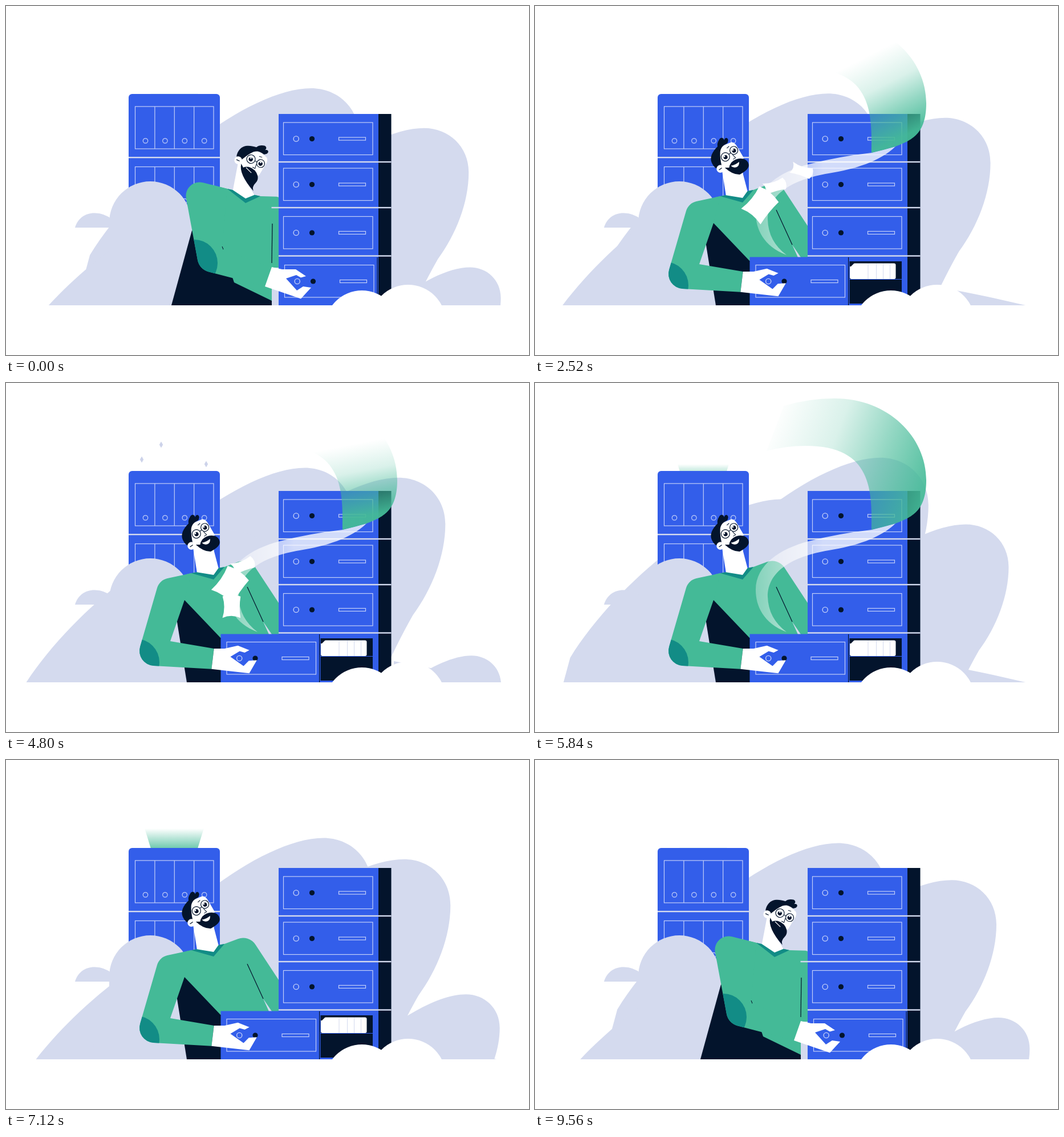
Animation, 917 px wide and 611 px high, one loop 9.6 s. Source, as an HTML page with a canvas:

```html
<!DOCTYPE html>
<html lang="en">
<head>
<meta charset="utf-8">
<title>Cloud archive</title>
<style>
html, body { margin: 0; width: 100%; height: 100%; overflow: hidden; background: #fff; }
canvas { display: block; }
</style>
</head>
<body>
<canvas id="stage" width="917" height="611"></canvas>
<script>
const ctx = document.getElementById('stage').getContext('2d');
const LOOP = 9600, GROUND = 524, DEG = Math.PI / 180;
const BLUE = '#335eea', DARK = '#03142c', GREEN = '#44ba97', TEAL = '#128c86';
const CLOUD = '#d4daee', LINE = '#c3cff8', WHITE = '#fff';

// ---------- helpers ----------
const clamp = u => Math.min(1, Math.max(0, u));
const ramp = (t, a, b) => {
  const u = clamp((t - a) / (b - a));
  return u * u * (3 - 2 * u);
};
const bump = (t, center, width) => Math.exp(-(((t - center) / width) ** 2));
const lerp = (a, b, u) => a + (b - a) * u;
const between = (p, q, u) => p.map((v, i) => lerp(v, q[i], u));
const shift = ([x, y], dx, dy) => [x + dx, y + dy];
const spin = ([x, y], angle) => [
  x * Math.cos(angle) - y * Math.sin(angle),
  x * Math.sin(angle) + y * Math.cos(angle)
];
const green = a => `rgba(68,186,151,${a})`;
const white = a => `rgba(255,255,255,${a})`;

function fill(path, color) { ctx.fillStyle = color; ctx.fill(path); }
function stroke(path, color, width = 1.2) {
  ctx.strokeStyle = color; ctx.lineWidth = width; ctx.stroke(path);
}
function box(x, y, w, h, color) { ctx.fillStyle = color; ctx.fillRect(x, y, w, h); }
function frame(x, y, w, h) {
  ctx.strokeStyle = LINE; ctx.lineWidth = 1.2; ctx.strokeRect(x, y, w, h);
}
function disc(x, y, r) {
  const path = new Path2D();
  path.arc(x, y, r, 0, 7);
  return path;
}
// corners are [x, y] or [x, y, radius]
function shape(...corners) {
  const path = new Path2D(), n = corners.length;
  path.moveTo(...between(corners[n - 1], corners[0], .5).slice(0, 2));
  corners.forEach(([x, y, r = 0], i) => {
    const [nx, ny] = corners[(i + 1) % n];
    path.arcTo(x, y, nx, ny, r);
  });
  path.closePath();
  return path;
}
function gradient(x0, y0, x1, y1, stops) {
  const g = ctx.createLinearGradient(x0, y0, x1, y1);
  for (const [at, color] of stops) g.addColorStop(at, color);
  return g;
}
// moves the origin to x, y for the time of one drawing
function at(x, y, angle, scale, paint) {
  ctx.save();
  ctx.translate(x, y);
  ctx.rotate(angle);
  ctx.scale(scale, scale);
  paint();
  ctx.restore();
}

// ---------- drifting clouds ----------
const leaf = new Path2D('M-425,600 L-401,340 L-388,292 C-300,150 -110,0 0,0 C46,0 84,34 84,83 ' +
  'C84,140 60,200 26,246 Q-5,300 -40,380 V600 Z');
// one stop every STEP ms, the spline between them gives the drift
const STEP = 1200, FIRST = -3600;
const stops = [[310, 500], [387, 290], [417, 215], [535, 144], [626, 134], [711, 187],
  [781, 303], [816, 477], [835, 700]];
function drift(age) {
  const pos = (age - FIRST) / STEP, i = Math.floor(pos), u = pos - i;
  const p = k => stops[Math.min(stops.length - 1, Math.max(0, i + k))];
  return [0, 1].map(k => {
    const a = p(-1)[k], b = p(0)[k], c = p(1)[k], d = p(2)[k];
    return b + u / 2 * (c - a + u * (2 * a - 5 * b + 4 * c - d + u * (3 * (b - c) + d - a)));
  });
}
function clouds(t) {
  fill(new Path2D('M680,487 Q752,500 803,511 L860,524 H680 Z'), CLOUD);
  for (const birth of [0, 2740, 4920, 6860]) {
    const age = (t - birth - FIRST + LOOP) % LOOP + FIRST;
    if (age > 5200) continue;
    const shrink = .05 * clamp(-age / 1000) + .38 * Math.max(0, (age - 1000) / 3800) ** 2.2;
    at(...drift(age), 0, 1 - shrink, () => fill(leaf, CLOUD));
  }
}

// ---------- back cabinet, its beam and sparks ----------
function beam(t) {
  const h = 3 + 71 * (ramp(t, 2950, 3500) - ramp(t, 4000, 4550) + ramp(t, 5700, 6300) - ramp(t, 6860, 7350));
  const a = .08 + .72 * Math.min(1, h / 36), spread = 41 + h * .31;
  fill(shape([254, 155], [295 - spread, 155 - h], [295 + spread, 155 - h], [336, 155]),
    gradient(0, 155, 0, 155 - h, [[0, green(a)], [1, green(0)]]));
}
function sparks(t) {
  for (const [start, life] of [[3300, 1750], [6200, 850]]) {
    const u = (t - start) / life, far = (u - .15) / .71;
    if (u < 0 || u > 1) continue;
    ctx.globalAlpha = Math.min(1, u * 9) * (1 - ramp(u, .86, 1));
    const [r, g, b] = between([110, 125, 184], [205, 211, 234], clamp(far));
    for (const [x, y, dx, dy] of [[277, 124, -5, -16], [251, 145, -13, -11], [338, 151, 13, -9]]) {
      const p = [x + dx * far, y + dy * far];
      fill(shape(shift(p, 0, -5.5), shift(p, 3.2, 0), shift(p, 0, 5.5), shift(p, -3.2, 0)), `rgb(${r},${g},${b})`);
    }
    ctx.globalAlpha = 1;
  }
}
function cabinet() {
  const body = new Path2D();
  body.roundRect(215, 154, 160, 210, 6);
  fill(body, BLUE);
  box(215, 264, 160, 2.4, CLOUD);
  for (const y of [176, 281.5]) {
    frame(226.5, y, 137.5, 74);
    for (let i = 0; i < 4; i++) {
      const x = 226.5 + i * 34.4;
      if (i) stroke(new Path2D(`M${x},${y} v74`), LINE);
      stroke(disc(x + 18, y + 60, 4.2), LINE);
    }
  }
}
function hill() {
  const mound = disc(253, 379, 72);
  mound.rect(181, 379, 144, 146);
  fill(mound, CLOUD);
  fill(new Path2D('M121,388 C126,371 140,362 156,362.500 Q173,363 185,373 V388 Z'), CLOUD);
}
function archive(t) {
  const squash = .012 * (bump(t, 3560, 180) + bump(t, 6300, 180));
  const squeezed = (amount, paint) => at(295, GROUND, 0, 1 - amount, () => {
    ctx.translate(-295, -GROUND);
    paint(t);
  });
  squeezed(squash, beam);
  squeezed(squash, cabinet);
  squeezed(squash / 2, hill);
}

// ---------- man ----------
// key points at the closed drawer, with the drawer pulled, and leaning back
const rig = {
  shoulder: [[309, 300], [299, 322], [269, 345]],
  elbow: [[339, 461], [224, 456], [226, 493]],
  innerElbow: [[381, 427], [295, 430], [288, 452]],
  armpit: [[379, 421], [335, 365], [313, 380]],
  patch: [[330, 450], [228, 455], [228, 489]],
  neckLeft: [[388, 320], [357, 323], [325, 333]],
  neckRight: [[446, 333], [416, 325], [383, 322]],
  collar: [[420, 345], [391, 341], [364, 344]],
  farShoulder: [[482, 334], [460, 316], [426, 306]],
  side: [[482, 350], [482, 371], [482, 391]],
  hip: [[466, 516], [466, 446], [466, 446]],
  waist: [[400, 484], [383, 446], [376, 446]],
  seat: [[326, 393], [317, 355], [293, 375]],
  knee: [[290, 524], [305, 524], [317, 524]],
  seamTop: [[467, 381], [447, 367], [423, 357]],
  seamEnd: [[466, 450], [461, 433], [451, 418]],
  ear: [[407, 270], [368, 273], [325, 285]],
  turn: [[40], [0], [-22]],
  chin: [[55, 24], [33, 25], [28, 22]]
};
const poseAt = t =>
  ramp(t, 400, 1300) + ramp(t, 1500, 2100) - ramp(t, 7700, 8300) - ramp(t, 8300, 9200);
function posed(pose) {
  const i = pose < 1 ? 0 : 1, joints = {};
  for (const name in rig) joints[name] = between(rig[name][i], rig[name][i + 1], pose - i);
  return joints;
}

function head(t, pose, [chinX, chinY]) {
  fill(new Path2D('M2,-2 L8,-24 L15,-36 L35,-36 Q41,-34 42,-24 L45,-4 L40,15 L8,12 Z'), WHITE);
  fill(new Path2D(`M8,1 Q16,18 ${chinX},${chinY} Q48,20 49,11 Q50,4 44,-1 Q34,-8 22,-3 Q17,0 15,4 Z`), DARK);
  fill(new Path2D('M4,-4 C6,-14 8,-22 11,-28 C16,-36 22,-36 28,-37 C34,-41 32,-48 27,-46 Q24,-44 24,-42 ' +
    'C27,-48 22,-52 17,-48 Q11,-44 10,-38 C-2,-33 -10,-26 -10,-16 Q-10,-8 -6,-3 Z'), DARK);
  fill(disc(0, 0, 6.7), WHITE);
  stroke(new Path2D('M-3,1 L3,-.5'), DARK);
  for (const [x, y, r] of [[16, -16, 7.5], [34, -21, 7]]) {
    stroke(disc(x, y, r), DARK);
    fill(disc(x, y + .5, 3.6), DARK);
    fill(disc(x - 1.4, y - 1.4, 1.4), WHITE);
  }
  stroke(new Path2D('M23.500,-18 L27,-19 M24,-29 L29,-31 M29,-15 L32,-8 L27,-7'), DARK, 1);
  if (bump(t, 3560, 220) > .37) fill(disc(27.5, 2, 3.8), WHITE);
  else if (pose < .5) stroke(new Path2D('M19,1 L32,2'), WHITE);
  else fill(new Path2D('M19,2 Q27,4 35,1 Q33,8 27,8 Q21,7 19,2'), WHITE);
}

// the hand slides with the drawer, then tilts as the man leans back
const palm = [[366, 457], [384, 461], [408, 461], [426, 473], [417, 475.5], [409, 471], [391, 477],
  [410, 498], [421, 491], [435, 493], [417, 512.5], [354, 491]];
function handAt(pose) {
  const tilt = -12.5 * DEG * Math.max(0, pose - 1), slide = 100 * (1 - Math.min(1, pose));
  return palm.map(p => shift(spin(shift(p, -402, -467), tilt), 402 + slide, 467));
}

function man(t, pose) {
  const j = posed(pose), hand = handAt(pose);
  const wristTop = hand[0], wristLow = hand[hand.length - 1];
  const turn = j.turn[0] * DEG, onHead = (x, y) => shift(spin([x, y], turn), ...j.ear);

  fill(shape(j.seat, j.knee, [466, GROUND], j.hip, shift(j.armpit, 0, -10)), DARK);
  fill(shape([...j.shoulder, 24], j.neckLeft, j.neckRight, [...j.farShoulder, pose < .5 ? 8 : 26],
    j.side, [482, 458], [466, 458], j.hip, j.waist, j.armpit), GREEN);

  const arm = shape([...j.shoulder, 24], [...j.elbow, 26], wristLow, wristTop, j.innerElbow, j.armpit, j.neckLeft);
  fill(arm, GREEN);
  ctx.save();
  ctx.clip(arm);
  fill(disc(...j.patch, 41), TEAL);
  ctx.restore();

  if (pose < .3) stroke(new Path2D('M379,421 L381,426'), DARK, 1);
  stroke(new Path2D(`M${j.seamTop} L${j.seamEnd}`), DARK);
  if (pose > 1) fill(shape(j.seamEnd, [466, 440], [461, 440]), CLOUD);

  const left = between(j.neckLeft, j.neckRight, .17), right = between(j.neckLeft, j.neckRight, .82);
  fill(shape(j.neckLeft, j.collar, j.neckRight), TEAL);
  fill(shape(onHead(2, 2), left, shift(j.collar, 0, -8), right, onHead(34, 19)), WHITE);
  at(...j.ear, turn, 1, () => head(t, pose, j.chin));
}

// ---------- server ----------
function panel(x, y) {
  frame(x, y, 156.5, 56.5);
  stroke(disc(x + 22.2, y + 28.5, 4.6), LINE, 1.4);
  fill(disc(x + 50, y + 28.5, 4.6), DARK);
  frame(x + 97, y + 26, 47, 5);
}
function server(pose) {
  box(478, 189, 175, 335, BLUE);
  box(653, 189, 22.5, 335, DARK);
  for (const y of [204, 284, 368.5]) panel(486.5, y);

  box(480, 447, 163, 74, DARK);
  const files = new Path2D();
  files.roundRect(552, 450.5, 80.5, 27.5, 3);
  fill(files, WHITE);
  fill(shape([551, 450], [560, 450], [554, 456], [551, 456]), DARK);
  for (const x of [583.5, 598, 610, 622]) box(x, 451, 1, 27, CLOUD);
  box(480, 478, 163, 1, BLUE);

  const x = 478 - 101.5 * Math.min(1, pose);
  box(x, 439.5, 175, 84.5, BLUE);
  box(x + 172.5, 440, 1.2, 84, DARK);
  panel(x + 10.5, 453.5);
  for (const [y, left] of [[273, 478], [353, 465.5], [437.5, 478]]) box(left, y - 1.2, 675.5 - left, 2.4, CLOUD);
}

// ---------- ribbon and papers ----------
const strand = new Path2D('M441,436 C400,420 387,390 387,362 C387,318 430,290 480,277 ' +
  'Q535,263 590,257 L632,246 C605,272 560,286 515,293 C450,304 408,330 408,374 Q409,412 441,436 Z');
const band = new Path2D('M590,257 C591,190 592,110 475,110 Q440,110 406,119 L436,40 Q480,27 525,27 ' +
  'C620,27 686,95 686,170 C686,225 660,235 632,246 Q612,252 590,257 Z');

const curve = (a, b, c, u) => lerp(lerp(a, b, u), lerp(b, c, u), u);
function paper(u) {
  const x = lerp(curve(440, 325, 420, u), curve(325, 420, 640, u), u);
  const y = lerp(curve(450, 350, 270, u), curve(350, 270, 250, u), u);
  const size = 30 + 15 * bump(u, .35, .1), w = size - 10 * ramp(u, .35, .5), h = size + 6;
  ctx.globalAlpha = 1 - ramp(u, .7, 1);
  at(x, y, (u - .2) * 4, 1, () =>
    fill(new Path2D(`M${-w / 2},${-h / 2} q${w / 2},-7 ${w},0 q-3,${h / 2} 0,${h} q${-w / 2},-7 ${-w},0 q6,${-h / 2} 0,${-h}`), WHITE));
}
function flight(t, start, full, fade, end) {
  if (t < start || t > end) return;
  const rise = ramp(t, start, start + 260);
  const grow = clamp((t - start) / (full - start)), leave = clamp((t - fade) / (end - fade));
  const tail = 375 + 200 * leave, faint = 1 - ramp(leave, 0, .2);
  ctx.globalAlpha = rise * (1 - ramp(leave, .45, .9));
  fill(strand, gradient(tail, 0, tail + 130, 0,
    [[0, white(.3 * faint)], [.5, white(.3 + .25 * faint)], [1, white(.65 + .13 * faint)]]));

  const lean = 50 * grow ** 2;
  ctx.globalAlpha = rise * (1 - ramp(leave, .35, 1));
  fill(band, gradient(640 + lean, 240 - lean, curve(640, 715, 410, grow), curve(236, 38, 82, grow),
    [[0, green(.95)], [.32, green(.58)], [.62, green(.2)], [1, green(0)]]));

  ctx.save();
  ctx.beginPath();
  ctx.rect(0, 0, 917, 440);
  ctx.clip();
  for (const lead of [-.15, 0, .15]) {
    const u = (t - start) / 1000 + lead;
    if (u > 0 && u < 1) paper(u);
  }
  ctx.restore();
  ctx.globalAlpha = 1;
}

// ---------- scene ----------
function draw(t) {
  const pose = poseAt(t);
  box(0, 0, 917, 611, WHITE);
  ctx.save();
  ctx.beginPath();
  ctx.rect(0, 0, 917, GROUND);
  ctx.clip();
  clouds(t);
  archive(t);
  sparks(t);
  man(t, pose);
  server(pose);
  fill(shape(...handAt(pose)), WHITE);
  flight(t, 2000, 2850, 3350, 4200);
  flight(t, 4450, 5200, 6000, 6850);
  fill(disc(624, 563, 65), WHITE);
  fill(disc(705, 554, 66), WHITE);
  ctx.restore();
}
function tick() {
  draw(performance.now() % LOOP);
  requestAnimationFrame(tick);
}
tick();
</script>
</body>
</html>
```
